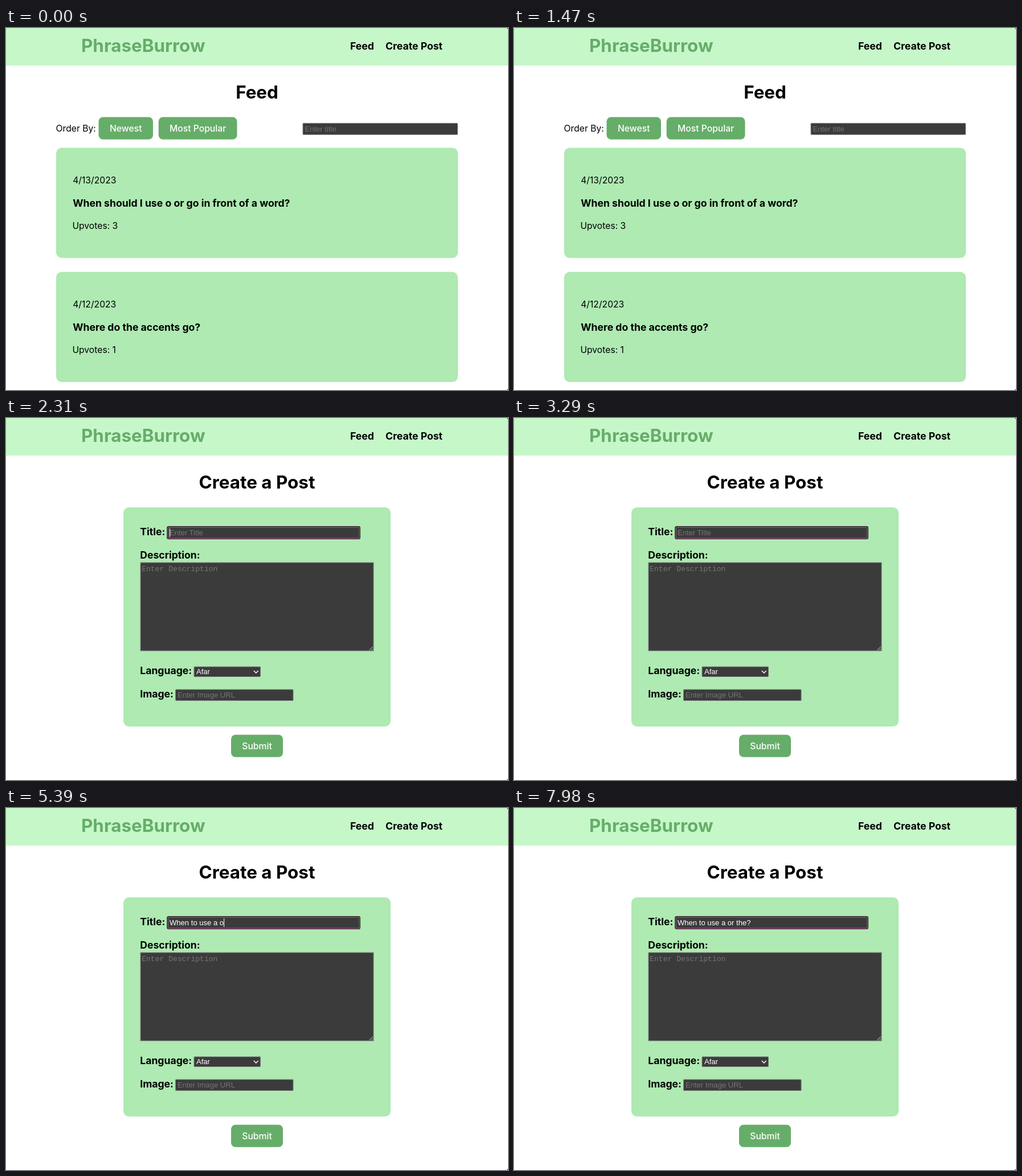
Write an HTML page that moves like this. It is 881 px wide and 636 px high and loops after 8000 ms.

```html
<!DOCTYPE html>
<html lang="en">
<head>
<meta charset="utf-8">
<title>Language forum</title>
<style>
  html, body { margin: 0; width: 100%; height: 100%; overflow: hidden; background: #fff; }
  svg { display: block; }
  text { font: 15.7px Inter, sans-serif; font-optical-sizing: none; white-space: pre; }
  .h1 { font-size: 31.4px; font-weight: 700; }
  .bold { font-size: 17.64px; font-weight: 700; }
  .mid { text-anchor: middle; }
  .logo, .btn rect { fill: #66ad69; }
  .btn text { fill: #fff; font-weight: 500; text-anchor: middle; }
  .card { fill: #aeeab2; }
  .box { fill: #3b3b3b; stroke: #808080; }
  .field { font: 13.07px "Liberation Sans", Arial, sans-serif; fill: #fff; }
  .hint { fill: #757575; }
  .mono { font-family: "Liberation Mono", monospace; }
  .line { fill: none; stroke: #fff; }
</style>
</head>
<body>
<svg width="881" height="636" viewBox="0 0 881 636">
  <rect width="881" height="66" fill="#c6f7c9"/>
  <text class="h1 logo" x="132" y="42">PhraseBurrow</text>
  <text class="bold" x="604" y="37.5">Feed</text>
  <text class="bold" x="666" y="37.5">Create Post</text>
  <path d="M879 0h2v2zM881 634v2h-2z" fill="#333"/>

  <g id="feed">
    <text class="h1 mid" x="440.5" y="124">Feed</text>
    <text x="87.5" y="182">Order By:</text>
    <g class="btn">
      <rect x="162.5" y="156.5" width="95.5" height="39.3" rx="7.8"/>
      <text x="210.2" y="182">Newest</text>
      <rect x="267.7" y="156.5" width="137.8" height="39.3" rx="7.8"/>
      <text x="336.6" y="182">Most Popular</text>
    </g>
    <rect class="box" x="521" y="167.3" width="271.5" height="20" rx="1"/>
    <text class="field hint" x="524.5" y="181.7">Enter title</text>
    <g id="posts"></g>
  </g>

  <g id="create">
    <text class="h1 mid" x="440.5" y="124">Create a Post</text>
    <rect class="card" x="206" y="157" width="469" height="385" rx="9.8"/>
    <text class="bold" x="235.2" y="206">Title:</text>
    <rect class="box" x="284" y="191.7" width="336.3" height="19.6" rx="1"/>
    <g id="ring">
      <rect x="282.3" y="190" width="339.6" height="23" rx="3" fill="#161616"/>
      <rect x="284.2" y="191.8" width="336" height="19.6" rx="1" fill="#3b3b3b" stroke="#c064a0"/>
    </g>
    <text id="title" class="field" x="287" y="206"></text>
    <rect id="caret" y="194" width="1" height="15" fill="#fff"/>

    <text class="bold" x="235.2" y="246.5">Description:</text>
    <rect class="box" x="236" y="254" width="409" height="155"/>
    <text class="field hint mono" x="238.2" y="268.5">Enter Description</text>
    <path class="line" d="M637.5 408l6.5-6.5M641.5 408l2.5-2.5" stroke-width=".8"/>

    <text class="bold" x="235.2" y="450.3">Language:</text>
    <rect class="box" x="330" y="437" width="116.5" height="17.5" rx="1"/>
    <text class="field" x="334" y="450.3">Afar</text>
    <path class="line" d="M434.8 444l4 4 4-4" stroke-width="1.4"/>

    <text class="bold" x="235.2" y="491.3">Image:</text>
    <rect class="box" x="297.5" y="477" width="206.5" height="19.5" rx="1"/>
    <text class="field hint" x="301" y="491.3">Enter Image URL</text>
    <g class="btn">
      <rect x="395" y="556.5" width="91" height="39.2" rx="7.8"/>
      <text x="440.5" y="582">Submit</text>
    </g>
  </g>
</svg>
<script>
const LOOP = 8000, STEP = 70, OPEN = 1540, FOCUS = 2310, BLINK = 500;
const TITLE = 'When to use a or the?';
// Moment at which each character of TITLE is typed
const KEYS = [3570, 3640, 3780, 3850, 3990, 4130, 4270, 4340, 4620, 4690, 4830,
  4900, 5040, 5320, 5390, 5460, 5530, 6370, 6510, 6580, 7420];

const el = id => document.getElementById(id);
const show = (id, on) => el(id).style.display = on ? '' : 'none';

const post = (y, date, title, votes) => `<g transform="translate(0 ${y})">
  <rect class="card" x="88" y="0" width="705" height="193.5" rx="9.8"/>
  <text x="117.2" y="62">${date}</text>
  <text class="bold" x="117.2" y="103.2">${title}</text>
  <text x="116.4" y="142.7">Upvotes: ${votes}</text></g>`;

el('posts').innerHTML =
  post(210.5, '4/13/2023', 'When should I use o or go in front of a word?', 3) +
  post(428.5, '4/12/2023', 'Where do the accents go?', 1);

function draw(now) {
  const t = Math.floor(now % LOOP / STEP) * STEP;
  const typed = KEYS.filter(k => k <= t).length;
  const last = typed ? KEYS[typed - 1] : FOCUS;
  const title = el('title');

  show('feed', t < OPEN);
  show('create', t >= OPEN);
  show('ring', t >= FOCUS);
  show('caret', t >= FOCUS && (t - last) % (2 * BLINK) < BLINK);

  title.textContent = typed ? TITLE.slice(0, typed) : 'Enter Title';
  title.classList.toggle('hint', !typed);
  el('caret').setAttribute('x', 287 + (typed && title.getComputedTextLength()));
  requestAnimationFrame(() => draw(performance.now()));
}
draw(0);
</script>
</body>
</html>
```
